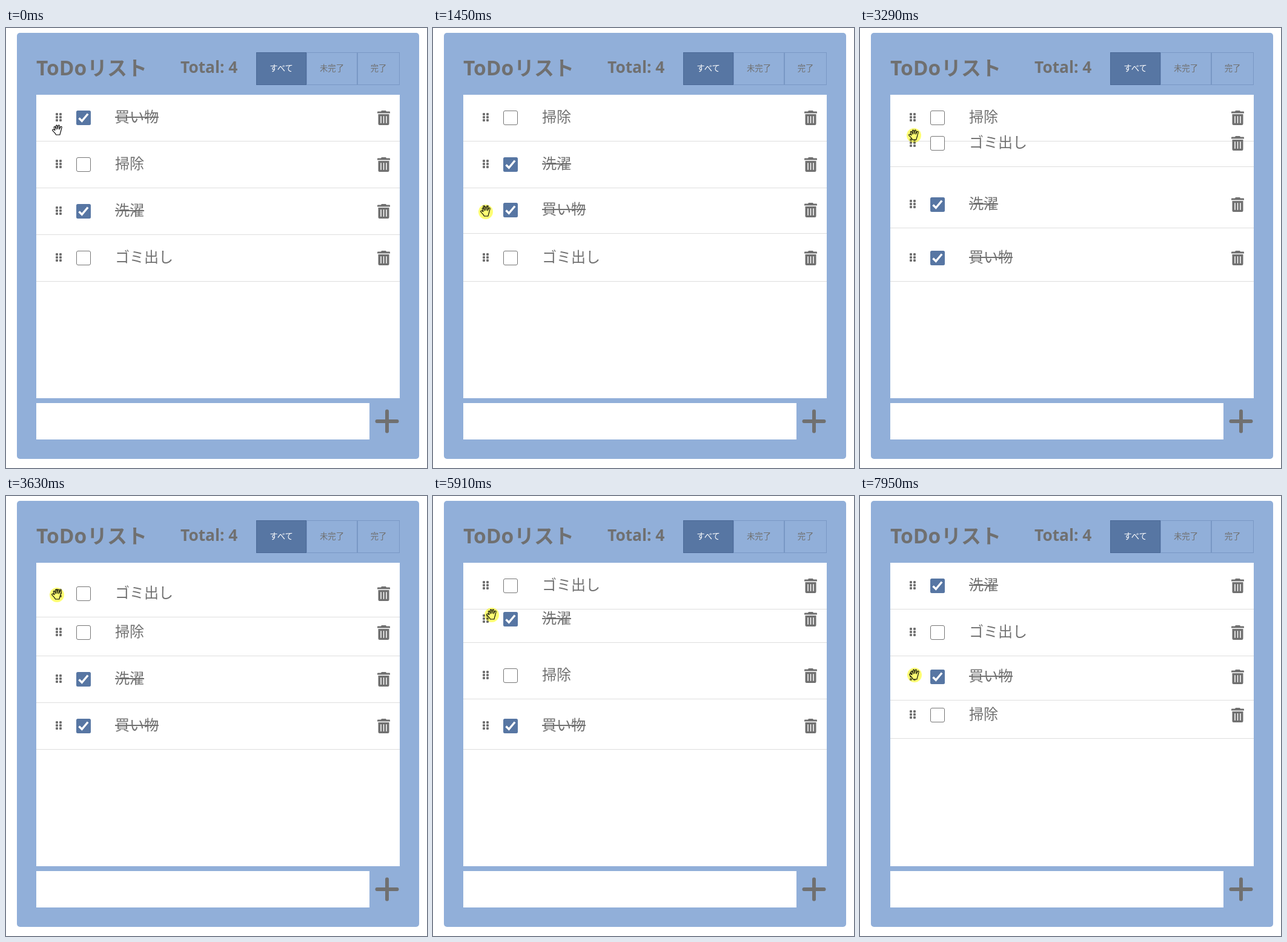
Recreate the animation shown at these times as an HTML page. Size 695 by 725 pixels, loop 8 s.

```html
<!DOCTYPE html>
<html lang="ja">
<head>
<meta charset="utf-8">
<title>ToDoリスト</title>
<style>
  html, body { margin: 0; width: 100%; height: 100%; overflow: hidden; background: #fff; }
  svg { display: block; font-family: "Noto Sans CJK JP", "Noto Sans CJK", sans-serif; fill: #707070; }
  .latin { font-family: "Noto Sans", sans-serif; font-weight: 700; }
  .white { fill: #fff; }
  .button { font-size: 13.33px; text-anchor: middle; }
  .task { font-size: 24px; }
  #glow { mix-blend-mode: multiply; }
</style>
</head>
<body>
<svg id="stage" width="695" height="725" viewBox="0 0 695 725">
  <rect x="18" y="8" width="664" height="702" rx="5" fill="#91afd9"/>
  <text class="latin" x="50" y="78" font-size="33.5">ToDo</text>
  <text x="134" y="78" font-size="33" font-weight="700">リスト</text>
  <text class="latin" x="288" y="74" font-size="26.3">Total: 4</text>
  <g id="filters"></g>
  <rect class="white" x="50" y="110" width="600" height="500"/>
  <rect class="white" x="50" y="618" width="550" height="60"/>
  <path d="M612.5 648H645.5M629 631.5V664.5" stroke="#707070" stroke-width="6" stroke-linecap="round"/>
  <g id="rows"></g>
  <g id="cursor">
    <path d="M4.9 9.6L3.3 5.2C2.8 3.6 4.9 2.9 5.5 4.4L6.9 8L6.5 2.4C6.4.8 8.6.6 8.8 2.2L9.4 7.5L10.2 2C10.5.5 12.5.8 12.4 2.4L12.1 8L13.9 4C14.6 2.6 16.5 3.3 16.1 4.9L14.3 12C13.8 14 13.2 14.5 13 17H6.4C6 15 4.5 13.6 3.2 12.3L1 10.2C0 9 1.4 7.4 2.8 8.2Z"
      fill="#fff" stroke="#000" stroke-width="1.1" stroke-linejoin="round"/>
  </g>
  <circle id="glow" r="12" fill="#ffff73"/>
</svg>
<script>
const LOOP = 8000, SLIDE = 333, LIST_TOP = 110;
const $ = id => document.getElementById(id);
const easeOut = p => 1 - (1 - p) ** 3;

// A row making room for the dragged one.
const slide = (t, from, to) => [[t, from], [t + SLIDE, to, 0, easeOut]];

// Track keys: [time, value, second value, easing]
const tasks = [
  { label: '掃除', track: [
    ...slide(590, 77, 0), ...slide(3300, 0, 77), ...slide(5720, 77, 154), ...slide(7822, 154, 231)] },
  { label: '洗濯', done: true, track: [
    ...slide(1090, 154, 77), ...slide(3130, 77, 154),
    [5560, 154], [5720, 115], [5910, 55], [5960, 38], [6080, 6], [6190, 0]] },
  { label: '買い物', done: true, track: [
    [540, 0], [610, 40], [890, 79], [1100, 125], [1310, 148], [1450, 152], [1780, 152], [1950, 154],
    ...slide(2970, 154, 231),
    [7270, 231], [7560, 221], [7822, 192], [7950, 150], [8000, 136]] },
  { label: 'ゴミ出し', track: [
    [2420, 231], [2700, 222], [2930, 202], [2970, 192], [3130, 115], [3300, 38], [3420, 15],
    [3630, 13], [4020, 13], [4200, 0, 0, easeOut], ...slide(5950, 0, 77)] },
];

const cursorTrack = [
  [70, 85, 168], [210, 85, 151], [540, 85, 151], [610, 84, 197], [890, 82, 237], [1100, 84, 281],
  [1310, 87, 302], [1780, 87, 303], [2120, 88, 366], [2420, 88, 366], [2700, 91, 353],
  [2930, 93, 331], [3130, 91, 240], [3300, 89, 172], [3420, 87, 160], [3630, 84, 162],
  [4020, 84, 162], [4420, 79, 240], [4820, 79, 240], [5290, 92, 310], [5560, 92, 310],
  [5720, 95, 258], [5910, 97, 195], [6080, 96, 160], [6190, 95, 153], [6450, 95, 153],
  [7130, 90, 375], [7270, 90, 375], [7560, 90, 362], [7822, 90, 327], [7950, 90, 294], [8000, 90, 281],
];
const presses = [[410, 1780], [2390, 4020], [5560, 6120], [7200, LOOP]];

function sample(track, t, column = 1) {
  const next = track.findIndex(key => key[0] > t);
  if (next < 0) return track[track.length - 1][column];
  if (next === 0) return track[0][column];
  const a = track[next - 1], b = track[next];
  const p = (t - a[0]) / (b[0] - a[0]);
  return a[column] + (b[column] - a[column]) * (b[3] ? b[3](p) : p);
}

const filterButton = (label, x, width, active) => `
  <rect x="${x + .5}" y="40.5" width="${width}" height="53"
    fill="${active ? '#5776a3' : 'none'}" stroke="${active ? '#4a6896' : '#7998c5'}"/>
  <text class="button ${active ? 'white' : ''}" x="${x + width / 2 + .5}" y="71">${label}</text>`;

const handle = [82, 88].flatMap(x => [30, 35, 40].map(y =>
  `<rect x="${x}" y="${y}" width="4" height="4" rx="1.3"/>`)).join('');

const trash = `<g transform="translate(613 26)">
  <path d="M1 1.5H6L7 0H14L15 1.5H20Q21 1.5 21 2.5V4.5H0V2.5Q0 1.5 1 1.5Z"/>
  <path d="M1.5 6H19.5V21.8Q19.5 24 17.3 24H3.7Q1.5 24 1.5 21.8Z"/>
  <path d="M6 9.7V20.3M10.5 9.7V20.3M15 9.7V20.3" stroke="#fff" stroke-width="1.5" stroke-linecap="round"/>
</g>`;

const checkbox = done => done
  ? `<rect x="116" y="26" width="24" height="24" rx="2.5" fill="#5776a3"/>
     <path d="M120.5 38.5L125.3 43.3L135.2 31.5" fill="none" stroke="#fff" stroke-width="3.4"/>`
  : `<rect x="116.5" y="26.5" width="23" height="23" rx="2.5" fill="#fff" stroke="#767676"/>`;

const row = ({ label, done }) => `<g>
  <rect x="50" y="76" width="600" height="1" fill="#dedede"/>
  ${handle}${checkbox(done)}
  <text class="task" x="180" y="45">${label}</text>
  ${done ? `<rect x="180" y="36" width="${label.length * 24}" height="2"/>` : ''}
  ${trash}
</g>`;

$('filters').innerHTML = filterButton('未完了', 496, 83) + filterButton('完了', 580, 69)
  + filterButton('すべて', 413, 82, true);
$('rows').innerHTML = tasks.map(row).join('');
const rowNodes = [...$('rows').children];

function draw(now) {
  const t = now % LOOP;
  tasks.forEach((task, i) => {
    const y = LIST_TOP + Math.round(sample(task.track, t));
    rowNodes[i].setAttribute('transform', `translate(0 ${y})`);
  });
  const x = Math.round(sample(cursorTrack, t, 1));
  const y = Math.round(sample(cursorTrack, t, 2));
  $('cursor').setAttribute('transform', `translate(${x - 9} ${y - 9})`);
  $('glow').setAttribute('transform', `translate(${x} ${y + 1})`);
  const pressed = presses.some(([from, to]) => t >= from && t < to);
  $('glow').setAttribute('visibility', pressed ? 'visible' : 'hidden');
}

const start = performance.now();
function tick() {
  draw(performance.now() - start);
  requestAnimationFrame(tick);
}
tick();
</script>
</body>
</html>
```
